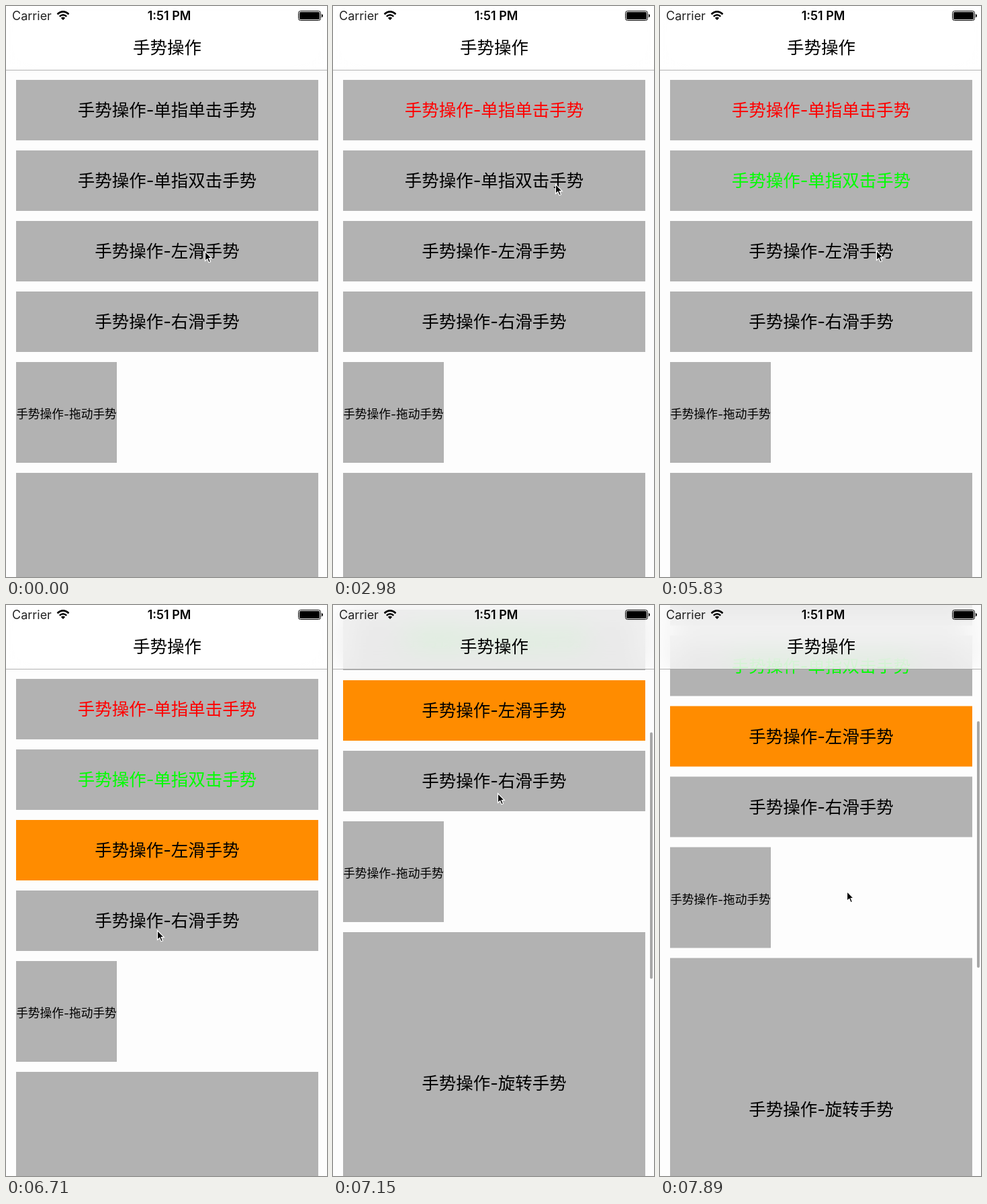
Animation of 478x850 px, one loop 8 s. Source, as an HTML page:

```html
<!DOCTYPE html>
<html lang="zh-CN">
<head>
<meta charset="utf-8">
<style>
html, body { margin: 0; width: 478px; height: 850px; overflow: hidden; background: #fdfdfd; }
body { position: relative; font: 25.5px Inter, "Noto Sans CJK SC", "Noto Sans CJK", sans-serif; color: #000; }
#list, #nav, #bar, #cursor, .row, svg { position: absolute; left: 0; top: 0; }
.row { left: 15px; width: 450px; background: #b2b2b2; text-align: center; white-space: nowrap; }
#bar { left: 472px; width: 4px; height: 367px; border-radius: 2px; background: rgba(0, 0, 0, .34); }
#nav { width: 478px; height: 95px; border-bottom: 1px solid rgba(0, 0, 0, .3);
  background: rgba(255, 255, 255, .72); backdrop-filter: blur(20px); }
#cursor { overflow: visible; }
</style>
</head>
<body>
<div id="list"></div>
<div id="bar"></div>
<div id="nav"></div>
<svg width="478" height="96">
  <text x="9" y="21" font-size="18" fill="#222">Carrier</text>
  <text x="243" y="21" font-size="18" font-weight="600" text-anchor="middle">1:51 PM</text>
  <text x="240" y="71" font-weight="500" text-anchor="middle">手势操作</text>
  <g fill="none" stroke="#000" stroke-width="2.5">
    <path d="M76.5 12.2Q85 4.6 93.5 12.2M79.7 15.6Q85 10.9 90.3 15.6"/>
    <path d="M85 21L81.8 17.8Q85 15.2 88.2 17.8Z" fill="#000" stroke="none"/>
    <rect x="435.5" y="7.5" width="33" height="14" rx="3" stroke-width="1"/>
    <rect x="437" y="9" width="30" height="11" rx="1.5" fill="#000" stroke="none"/>
    <path d="M470 12Q472 12.3 472 14.5T470 17Z" fill="#000" stroke="none"/>
  </g>
</svg>
<svg id="cursor" width="12" height="18">
  <path d="M.5.5V14.5L3.8 11.6 6 16.8 8.5 15.7 6.3 10.6H10.3Z" stroke="#fff" stroke-width="1.2"/>
</svg>
<script>
const $ = id => document.getElementById(id);
const DURATION = 8000;

function addRow(label, top, height, width = 450, size = 25.5, shift = 0) {
  const row = document.createElement('div');
  row.className = 'row';
  row.textContent = '手势操作-' + label + '手势';
  row.style.cssText = `top:${top}px;height:${height}px;width:${width}px;` +
    `line-height:${height + 2 * shift}px;font-size:${size}px`;
  $('list').append(row);
  return row;
}
const tap = addRow('单指单击', 110, 90);
const doubleTap = addRow('单指双击', 215, 90);
const swipe = addRow('左滑', 320, 90);
addRow('右滑', 425, 90);
addRow('拖动', 530, 150, 150, 17.7, 3);
addRow('旋转', 695, 450);

// Screen recording: each value holds until the next time. [ms, x, y]
const pointer = [
  [0, 296, 365], [600, 296, 250], [750, 296, 180], [1040, 297, 175], [1190, 298, 171],
  [1490, 299, 166], [1640, 300, 163], [2540, 306, 200], [2690, 320, 258], [2840, 329, 276],
  [2980, 331, 265], [3430, 342, 265], [3580, 349, 264], [4180, 348, 264], [4480, 341, 266],
  [5380, 339, 290], [5530, 334, 330], [5680, 328, 358], [5830, 322, 364], [5970, 298, 366],
  [6120, 240, 370], [6270, 216, 405], [6410, 220, 456], [6560, 225, 482], [6710, 225, 484],
  [6860, 228, 430], [7000, 232, 357], [7150, 245, 280], [7300, 260, 395], [7440, 266, 455],
  [7590, 275, 490], [7740, 278, 445], [7890, 278, 426]
];
// [ms, offset]
const scroll = [
  [0, 0], [6860, 48], [7000, 121.5], [7150, 208], [7300, 285], [7440, 302],
  [7590, 200], [7740, 179], [7890, 169.5]
];
const at = (keys, t) => keys.findLast(key => key[0] <= t);

function draw(now) {
  const t = now % DURATION;
  const [, x, y] = at(pointer, t);
  const [, offset] = at(scroll, t);
  $('cursor').style.transform = `translate(${x}px, ${y}px)`;
  $('list').style.transform = `translateY(${-offset}px)`;
  $('bar').style.transform = `translateY(${99.5 + offset * .433}px)`;
  $('bar').style.opacity = offset ? 1 : 0;
  tap.style.color = t < 1940 ? '#000' : '#f00';
  doubleTap.style.color = t < 4930 ? '#000' : '#0f0';
  swipe.style.background = t < 6120 ? '#b2b2b2' : '#ff8c00';
  requestAnimationFrame(draw);
}
requestAnimationFrame(draw);
</script>
</body>
</html>
```
